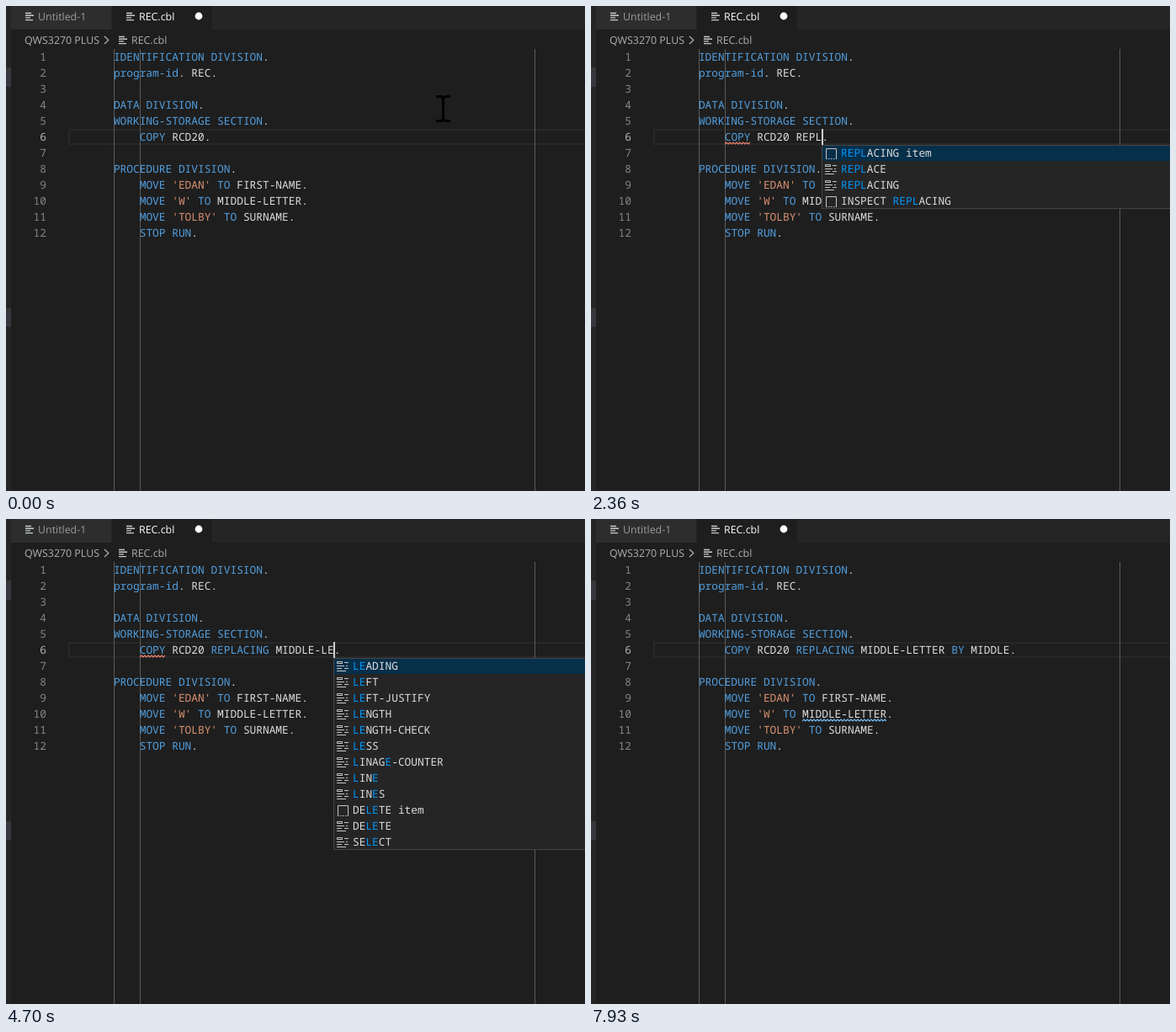
These frames come from a looping animation (688x576 px, 8 s). An HTML page:

```html
<!DOCTYPE html>
<html lang="en">
<head>
<meta charset="utf-8">
<title>Editor typing</title>
<style>
html, body { margin: 0; width: 100%; height: 100%; overflow: hidden; background: #1e1e1e; }
#stage {
  position: relative; width: 688px; height: 576px; overflow: hidden; background: #1e1e1e;
  font: 500 12.83px/19px "Noto Sans Mono", "DejaVu Sans Mono", monospace;
  color: #dcdcdc; white-space: pre; text-rendering: geometricPrecision;
  font-variant-ligatures: none;
}
#stage div, #stage svg, .tok { position: absolute; }
.ui { font: 12.4px/20px "Open Sans", "Noto Sans", sans-serif; color: #b0b0b0; }
.blob { left: 0; width: 6px; background: #37373d; }
.ruler { top: 51px; bottom: 0; width: 1px; background: #5a5a5a; }
.num { left: 0; width: 48px; text-align: right; color: #858585; }
.row { left: 0; height: 19px; }
.kw { color: #519fe0; }
.str { color: #dc9272; }
#current { left: 74px; top: 146px; width: 640px; height: 19px; box-sizing: border-box; border: 2px solid #282828; }
#caret { top: 146px; width: 2px; height: 19px; background: #d0d0d0; }
#popup { top: 165px; width: 430px; background: #252526; }
#popup::after { content: ""; position: absolute; inset: 0; border: 1px solid #454545; }
.item { left: 0; width: 100%; height: 19px; }
.item:first-child { background: #062f4a; }
.item svg { left: 3px; top: 2px; }
.item span { position: absolute; left: 23px; top: 0; }
.item b { font-weight: inherit; color: #0097fb; }
</style>
</head>
<body>
<div id="stage"></div>
<script>
const LOOP = 8000, CHAR = 7.7, LEFT = 74, TOP = 51, LINE = 19;
const stage = document.getElementById("stage");
const colX = col => LEFT + col * CHAR;
const rowY = row => TOP + row * LINE;

function add(html) {
  stage.insertAdjacentHTML("beforeend", html);
  return stage.lastElementChild;
}

const KEYWORDS = new Set(("IDENTIFICATION DIVISION program-id DATA WORKING-STORAGE SECTION " +
  "COPY PROCEDURE MOVE TO STOP RUN REPLACING BY").split(" "));

function highlight(text) {
  return text.replace(/'[^']*'|[\w-]+|\S/g, (word, col) => {
    const kind = word[0] === "'" ? "str" : KEYWORDS.has(word) ? "kw" : "";
    return `<span class="tok ${kind}" style="left:${colX(col)}px">${word}</span>`;
  }).replace(/ +(?=<span|$)/g, "");
}

const source = [
  "       IDENTIFICATION DIVISION.",
  "       program-id. REC.",
  "",
  "       DATA DIVISION.",
  "       WORKING-STORAGE SECTION.",
  "           COPY RCD20.",
  "",
  "       PROCEDURE DIVISION.",
  "           MOVE 'EDAN' TO FIRST-NAME.",
  "           MOVE 'W' TO MIDDLE-LETTER.",
  "           MOVE 'TOLBY' TO SURNAME.",
  "           STOP RUN."
];
const EDIT_ROW = 5, EDIT_COL = 21;
const prefix = source[EDIT_ROW].slice(0, EDIT_COL);

// Window chrome
const box = (x, y, w, h, color) =>
  add(`<div style="left:${x}px;top:${y}px;width:${w}px;height:${h}px;background:${color}"></div>`);
const label = (x, y, text, color = "") =>
  add(`<div class="ui" style="left:${x}px;top:${y}px;color:${color}">${text}</div>`);
const fileIcon = (x, y) =>
  add(`<svg style="left:${x}px;top:${y}px" width="11" height="11" fill="none" stroke="#c8cccc" stroke-width="1.4">
    <path d="M0 1.5H7M0 4.2H10M0 6.9H6M0 9.6H9"/></svg>`);

box(0, 0, 688, 28, "#252526");
box(0, 28, 6, 548, "#252526");
box(6, 0, 119, 28, "#2d2d2d");
box(126, 0, 119, 28, "#1e1e1e");
add('<div class="blob" style="top:73px;height:23px"></div>');
add('<div class="blob" style="top:359px;height:22px"></div>');
fileIcon(23, 7);
label(38, 3, "Untitled-1", "#9c9c9c");
fileIcon(143, 7);
label(158, 3, "REC.cbl", "#ffffff");
add('<svg style="left:224px;top:7px" width="10" height="10"><circle cx="5" cy="5" r="4.4" fill="#fff"/></svg>');
label(22, 31, "QWS3270 PLUS");
add('<svg style="left:116px;top:35px" width="8" height="11" fill="none" stroke="#b0b0b0" stroke-width="1.2"><path d="M1 1L5.8 5.5L1 10"/></svg>');
fileIcon(134, 35);
label(149, 31, "REC.cbl");

// Editor
add('<div id="current"></div>');
for (const x of [128, 159, 628]) add(`<div class="ruler" style="left:${x}px"></div>`);
const rows = source.map((text, i) => {
  const color = i === EDIT_ROW ? "#b4b4b4" : "";
  add(`<div class="num" style="top:${rowY(i)}px;color:${color}">${i + 1}</div>`);
  return add(`<div class="row" style="top:${rowY(i)}px">${highlight(text)}</div>`);
});

function squiggle(col, row, length, color) {
  const w = length * CHAR;
  let d = "M0 3";
  for (let x = 2; x <= w; x += 2) d += `L${x} ${x % 4 ? 1 : 3}`;
  return add(`<svg style="left:${colX(col)}px;top:${rowY(row) + 15}px" width="${w}" height="4"
    fill="none" stroke="${color}" stroke-width="1.2"><path d="${d}"/></svg>`);
}
const copyError = squiggle(11, 5, 4, "#f48771");
const nameHint = squiggle(23, 9, 13, "#75beff");
const caret = add('<div id="caret"></div>');
const popup = add('<div id="popup"></div>');
const mouse = add(`<svg style="left:0;top:0" width="19" height="34" fill="none" stroke="#000" stroke-width="3">
  <path d="M1 2.5H7L9.5 4.5L12 2.5H18M9.5 4V30M1 31.5H7L9.5 29.5L12 31.5H18"/></svg>`);

// Completion lists; a star marks a snippet
const list = text => text.split(",");
const R = list("*READ item,*REPLACING item,*RETURN item,*REWRITE item,RANDOM,READ,RECORD,REDEFINES,RELATIVE,REPLACE,REPLACING,RETURN");
const REPL = list("*REPLACING item,REPLACE,REPLACING,*INSPECT REPLACING");
const REPLACI = list("*REPLACING item,REPLACING,*INSPECT REPLACING");
const MI = list("*MOVE item,*MOVE item TO item,*MULTIPLY BY,*MULTIPLY BY GIVING,*MULTIPLY item,MULTIPLE,MULTIPLY,*MOVE CORR item,*MOVE CORR item TO item,*MERGE fileName,*MERGE USING,END-MULTIPLY");
const MID = ["SORT-MODE-SIZE"];
const LE = list("LEADING,LEFT,LEFT-JUSTIFY,LENGTH,LENGTH-CHECK,LESS,LINAGE-COUNTER,LINE,LINES,*DELETE item,DELETE,SELECT");
const LET = list("*DELETE item,*DELETE fileName,*SELECT item,DELETE,DELETED,END-DELETE,SELECT,SELECTED,SELECTION,COMPLETE,LEFT,LEFTMOST");
const B = list("*BEFORE id|lit,*BY item,*BY UNTIL,BACKGROUND-COLOR,BACKGROUND-COLOUR,BASIS,BEEP,BEFORE,BEGINNING,BELL,BINARY,BIT");
const BY = list("*BY item,*BY UNTIL,BY,BINARY,*DIVIDE BY,*DIVIDE BY GIVING,*MULTIPLY BY,*MULTIPLY BY GIVING,*REPLACING BY,BINARY-LONG,BINARY-SHORT,BINARY-CHAR");

// time, text typed so far, completions, letters to mark
const FIELD = " REPLACING MIDDLE-LETTER";
const steps = [
  [0, ""], [1900, " "],
  [2130, " R", R, "R"], [2200, " RE", R, "RE"], [2260, " REP", REPL, "REP"],
  [2360, " REPL", REPL, "REPL"], [2460, " REPLA", REPL, "REPLA"], [2560, " REPLAC", REPL, "REPLAC"],
  [2660, " REPLACI", REPLACI, "REPLACI"], [2760, " REPLACIN", REPLACI, "REPLACIN"],
  [2860, " REPLACING", REPLACI, "REPLACING"], [3160, " REPLACING "],
  [3460, " REPLACING M", MI, "M"], [3560, " REPLACING MI", MI, "MI"],
  [3630, " REPLACING MID", MID, "MDI"], [3730, " REPLACING MIDD"],
  [3860, " REPLACING MIDDL"], [3960, " REPLACING MIDDLE"], [4130, " REPLACING MIDDLE-"],
  [4560, " REPLACING MIDDLE-L", LE, "L"], [4660, " REPLACING MIDDLE-LE", LE, "LE"],
  [4800, " REPLACING MIDDLE-LET", LET, "LET"], [4930, " REPLACING MIDDLE-LETT"],
  [5160, " REPLACING MIDDLE-LETTE"], [5230, FIELD], [5300, FIELD + " "],
  [5530, FIELD + " B", B, "B"], [5630, FIELD + " BY", BY, "BY"], [5900, FIELD + " BY "],
  [6300, FIELD + " BY M", MI, "M"], [6400, FIELD + " BY MI", MI, "MI"],
  [6700, FIELD + " BY MID"], [6830, FIELD + " BY MIDD"],
  [7030, FIELD + " BY MIDDL"], [7500, FIELD + " BY MIDDLE"]
];

const ICONS = {
  snippet: '<path d="M2.5 15V2.5H14.5V15" fill="none" stroke="#c5c5c5"/>' +
    '<path d="M2 14.5H15" stroke="#c5c5c5" stroke-dasharray="1.5 1.5"/>',
  keyword: '<path d="M1.5 2.5H7.5V4.5H1.5ZM10 3.5H15M1 7.5H10M12 7.5H14M1 10.5H7M10 10.5H15M1 13.5H12" fill="none" stroke="#c5c5c5"/>'
};

function mark(text, query) {
  let i = 0;
  return [...text].map(ch =>
    i < query.length && ch.toUpperCase() === query[i] ? (i++, `<b>${ch}</b>`) : ch).join("");
}

function showPopup(items, query, x) {
  popup.style.display = items ? "" : "none";
  if (!items) return;
  popup.style.left = x + "px";
  popup.style.height = items.length * LINE + "px";
  popup.innerHTML = items.map((item, i) => {
    const icon = item[0] === "*" ? ICONS.snippet : ICONS.keyword;
    const text = mark(item.replace("*", ""), query);
    return `<div class="item" style="top:${i * LINE}px">` +
      `<svg width="16" height="16">${icon}</svg><span>${text}</span></div>`;
  }).join("");
}

const show = (el, on) => { el.style.visibility = on ? "visible" : "hidden"; };
const between = (t, a, b) => t >= a && t < b;

// Pointer centre: time, x, y
const path = [[260, 420, 176], [560, 240.5, 155], [840, 240.5, 155], [1060, 579.5, 162], [1100, 579.5, 162]];

function pointer(t) {
  if (t < 30) return [519.5, 122];
  const i = path.findIndex(p => p[0] > t);
  if (i < 1) return null;
  const [t0, x0, y0] = path[i - 1], [t1, x1, y1] = path[i];
  const u = (t - t0) / (t1 - t0), k = u * u * (3 - 2 * u);
  return [x0 + (x1 - x0) * k, y0 + (y1 - y0) * k];
}

let shown = null;
function render(t) {
  const step = steps.findLast(s => s[0] <= t);
  if (step !== shown) {
    shown = step;
    const [, typed, items, query] = step;
    const x = Math.floor(colX(EDIT_COL + typed.length));
    rows[EDIT_ROW].innerHTML = highlight(prefix + typed + ".");
    caret.style.left = x + "px";
    showPopup(items, query, x);
  }
  show(caret, between(t, 960, 1460) || between(t, 1900, 7930));
  show(copyError, between(t, 2200, 6300));
  show(nameHint, t >= 6300);
  const pos = pointer(t);
  show(mouse, pos);
  if (pos) mouse.style.transform = `translate(${pos[0] - 9.5}px, ${pos[1] - 17}px)`;
}

const start = performance.now();
function tick() {
  render((performance.now() - start) % LOOP);
  requestAnimationFrame(tick);
}
render(0);
tick();
</script>
</body>
</html>
```
